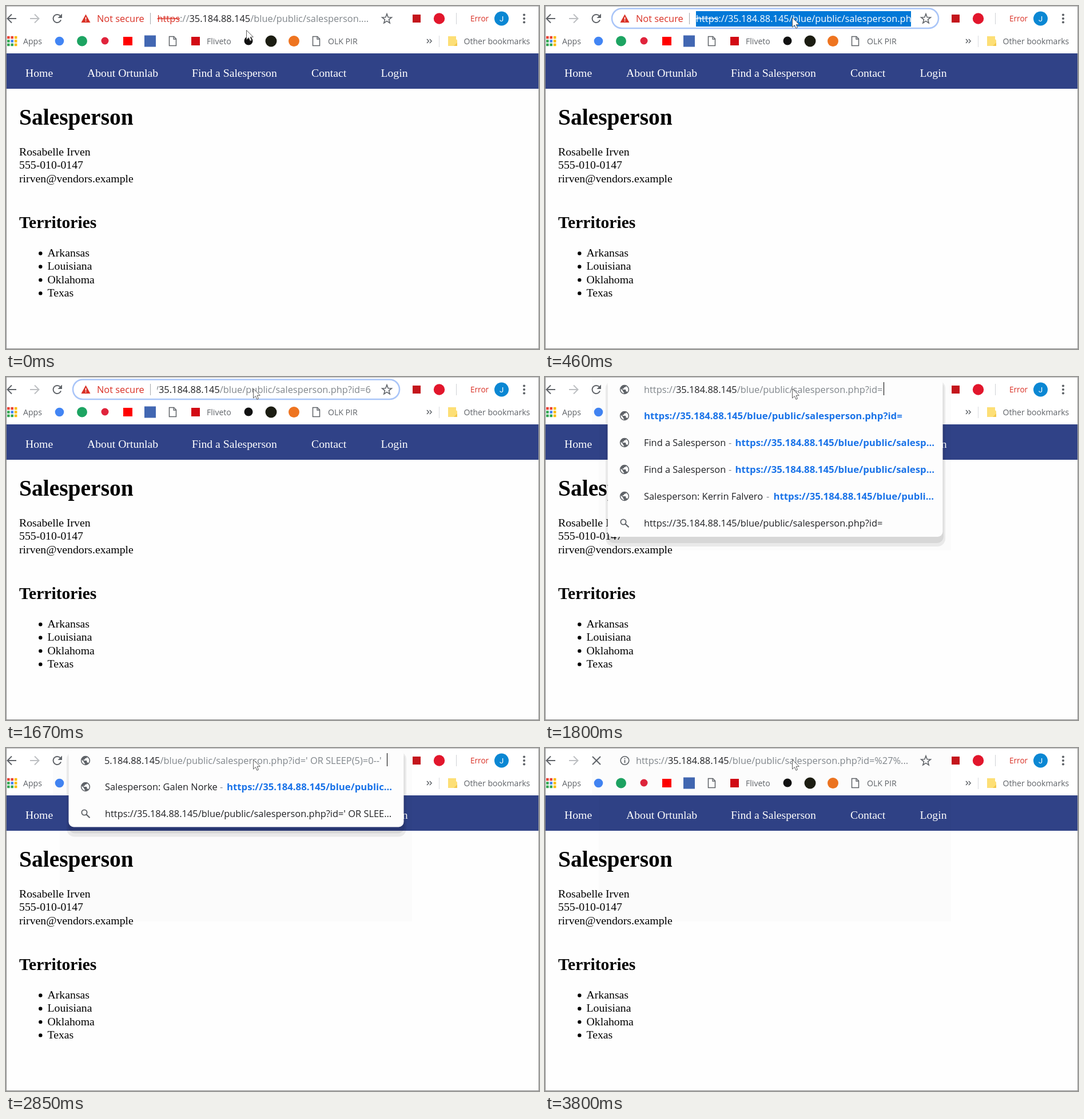
Write an HTML page with a canvas that moves like this. It is 932x601 px and loops after 8000 ms.

```html
<!DOCTYPE html>
<html lang="en">
<head>
<meta charset="utf-8">
<title>Salesperson</title>
<style>
html, body { margin: 0; width: 100%; height: 100%; overflow: hidden; background: #fff; }
canvas { display: block; }
</style>
</head>
<body>
<canvas id="stage" width="932" height="601"></canvas>
<script>
const ctx = document.getElementById('stage').getContext('2d');
const LOOP = 8000;
const UI = '"Open Sans", "Noto Sans", sans-serif';
const SERIF = '"Liberation Serif", "Times New Roman", serif';
const URL_FONT = `16.4px ${UI}`;
const BOLD_FONT = `bold 16.78px ${UI}`;
const MARK_FONT = `14.1px ${UI}`;
const BODY_FONT = `19.77px ${SERIF}`;
const INK = '#202124', GREY = '#80868b', ICON = '#5f6368', RED = '#d93025', LINK = '#1a73e8';
const HOST = '35.184.88.145', PATH = '/blue/public/salesperson';
const BASE = `https://${HOST}${PATH}.php?id=`;
const GLOBE = new Path2D('M12 2a10 10 0 1 0 0 20a10 10 0 1 0 0-20z' +
  'M11 19.9c-4-.5-7-3.8-7-7.9 0-.6.1-1.2.2-1.8L9 15v1c0 1.1.9 2 2 2z' +
  'M17.9 17.4c-.3-.8-1-1.4-1.9-1.4h-1v-3c0-.6-.4-1-1-1H8v-2h2c.6 0 1-.4 1-1V7h2c1.1 0 2-.9 2-2v-.4c2.9 1.2 5 4 5 7.4 0 2.1-.8 4-2.1 5.4z');

// ---------- helpers ----------
function text(str, x, y, font, color) {
  ctx.font = font;
  ctx.fillStyle = color;
  ctx.fillText(str, x, y);
  return x + ctx.measureText(str).width;
}

function widthOf(str, font) {
  ctx.font = font;
  return ctx.measureText(str).width;
}

function rect(x, y, w, h, color) {
  ctx.fillStyle = color;
  ctx.fillRect(x, y, w, h);
}

function disc(x, y, r, color) {
  ctx.fillStyle = color;
  ctx.beginPath();
  ctx.arc(x, y, r, 0, Math.PI * 2);
  ctx.fill();
}

function ring(x, y, r, color, width) {
  ctx.strokeStyle = color;
  ctx.lineWidth = width;
  ctx.beginPath();
  ctx.arc(x, y, r, 0, Math.PI * 2);
  ctx.stroke();
}

function trace(points, close) {
  ctx.beginPath();
  points.forEach(([x, y]) => ctx.lineTo(x, y));
  if (close) ctx.closePath();
}

function line(points, color, width = 2, close = false) {
  trace(points, close);
  ctx.strokeStyle = color;
  ctx.lineWidth = width;
  ctx.stroke();
}

function poly(points, color) {
  trace(points, true);
  ctx.fillStyle = color;
  ctx.fill();
}

function round(x, y, w, h, r, color) {
  ctx.beginPath();
  ctx.roundRect(x, y, w, h, r);
  ctx.fillStyle = color;
  ctx.fill();
}

function clipped(x, w, draw) {
  ctx.save();
  ctx.beginPath();
  ctx.rect(x, 5, w, 34);
  ctx.clip();
  draw();
  ctx.restore();
}

// ---------- icons ----------
function arrow(x, dir, color) {
  line([[x - 8 * dir, 22], [x + 7 * dir, 22]], color);
  line([[x, 14.5], [x + 7.5 * dir, 22], [x, 29.5]], color);
}

function reload() {
  ctx.strokeStyle = ICON;
  ctx.lineWidth = 2;
  ctx.beginPath();
  ctx.arc(89.5, 22, 7, 0.35, Math.PI * 1.75);
  ctx.stroke();
  poly([[98, 13.5], [98, 21], [90.5, 21]], ICON);
}

function stop() {
  line([[83, 15], [97, 29]], ICON);
  line([[97, 15], [83, 29]], ICON);
}

function warning() {
  poly([[139.5, 14.5], [147.5, 29], [131.5, 29]], RED);
  rect(138.7, 19.5, 1.7, 4.5, '#fff');
  rect(138.7, 25.3, 1.7, 1.7, '#fff');
}

function star() {
  const points = Array.from({ length: 10 }, (_, i) => {
    const r = i % 2 ? 3.7 : 8.8, a = i * Math.PI / 5 - Math.PI / 2;
    return [666 + r * Math.cos(a), 22.7 + r * Math.sin(a)];
  });
  line(points, ICON, 1.6, true);
}

function globe(y) {
  ctx.save();
  ctx.translate(139, y);
  ctx.scale(0.82, 0.82);
  ctx.translate(-12, -12);
  ctx.fillStyle = ICON;
  ctx.fill(GLOBE, 'evenodd');
  ctx.restore();
}

function magnifier(y) {
  ring(137, y - 2, 4.6, ICON, 1.9);
  line([[140.5, y + 1.5], [146.5, y + 7.3]], ICON, 2.2);
}

function info() {
  ring(139.5, 22, 7.3, ICON, 1.6);
  rect(138.6, 21, 1.8, 5.2, ICON);
  rect(138.6, 17.7, 1.8, 1.9, ICON);
}

function page(x) {
  line([[x, 53.5], [x + 8, 53.5], [x + 12, 57.5], [x + 12, 69.5], [x, 69.5]], ICON, 1.5, true);
  line([[x + 7.5, 54], [x + 7.5, 58], [x + 12, 58]], ICON, 1.3);
}

function pointer(x, y) {
  const shape = [[0, 0], [0, 16.5], [3.9, 13], [6.4, 18.7], [9, 17.5], [6.6, 12], [11.8, 11.7]]
    .map(([dx, dy]) => [x + 0.5 + dx, y + 0.5 + dy]);
  poly(shape, '#fff');
  line(shape, '#5c5c5c', 1, true);
}

// ---------- page ----------
function content() {
  rect(0, 0, 932, 601, '#fff');
  rect(0, 145, 932, 456, '#fefefe');
  rect(0, 83, 932, 62, '#304287');
  const nav = [['Home', 34], ['About Ortunlab', 142], ['Find a Salesperson', 325], ['Contact', 534], ['Login', 655.5]];
  nav.forEach(([label, x]) => text(label, x, 123.5, `19.7px ${SERIF}`, '#fff'));

  text('Salesperson', 23, 208, `bold 39.5px ${SERIF}`, '#000');
  ['Rosabelle Irven', '555-010-0147', 'rirven@vendors.example'].forEach((row, i) =>
    text(row, 23, 262 + i * 23.3, BODY_FONT, '#000'));
  text('Territories', 23, 388.5, `bold 29.6px ${SERIF}`, '#000');
  ['Arkansas', 'Louisiana', 'Oklahoma', 'Texas'].forEach((row, i) => {
    const y = 439 + i * 23.3;
    disc(60.3, y - 5.5, 3.2, '#000');
    text(row, 72.5, y, BODY_FONT, '#000');
  });
}

function bookmarks() {
  const tiles = ['#ea4335', '#ea4335', '#fbbc05', '#34a853', '#4285f4', '#fbbc05', '#34a853', '#34a853', '#fbbc05'];
  tiles.forEach((c, i) => rect(2 + (i % 3) * 6.4, 52.8 + Math.floor(i / 3) * 6.4, 4.6, 4.6, c));
  text('Apps', 30, 66.5, MARK_FONT, ICON);
  disc(93.5, 61.5, 7.8, '#4285f4');
  disc(133, 61.5, 9, '#1da462');
  disc(173, 61, 6.5, '#e0243c');
  rect(205, 54, 16, 15, '#f00');
  rect(242, 51.5, 20, 20, '#4267b2');
  page(285.5);
  rect(324, 54, 15, 15, '#d20a14');
  text('Fliveto', 351, 66.5, MARK_FONT, ICON);
  disc(424, 61, 7.5, '#111');
  disc(463.5, 61.5, 10, '#1c1d12');
  disc(503.5, 61.5, 9.5, '#ee7420');
  page(536.5);
  text('OLK PIR', 563, 66.5, MARK_FONT, ICON);
  [736, 740.8].forEach(x => line([[x, 58], [x + 3.3, 61.5], [x, 65]], ICON, 1.5));
  rect(757, 52, 1, 20, '#dadce0');
  poly([[773, 53], [787, 53], [787, 58], [789, 60], [789, 70], [773, 70]], '#fddf76');
  poly([[783, 70], [789, 64], [789, 70]], '#f3c84b');
  text('Other bookmarks', 800.5, 66.5, MARK_FONT, ICON);
}

function toolbar(loading) {
  arrow(10, -1, ICON);
  arrow(50, 1, '#bdbfc2');
  loading ? stop() : reload();
  rect(711, 15, 14, 14, '#c4161c');
  disc(757.5, 22, 9.7, '#e2162c');
  rect(787, 12, 1, 20, '#d0d2d5');
  text('Error', 812, 27, `13.6px ${UI}`, RED);
  disc(866.5, 22, 12.5, '#0b87d3');
  text('J', 863, 26.6, '13px Roboto, sans-serif', '#fff');
  [15.5, 22, 28.5].forEach(y => disc(906, y, 2.1, ICON));
}

function frame() {
  rect(0, 0, 932, 1, '#b4b4b4');
  rect(0, 0, 1, 601, '#8c8c8c');
  rect(931, 0, 1, 601, '#a0a0a0');
  rect(0, 600, 932, 1, '#8c8c8c');
}

// ---------- address bar ----------
function address(x, tail, scheme = GREY) {
  let end = text('https', x, 28, URL_FONT, scheme);
  if (scheme !== GREY) rect(x, 21.5, end - x, 1.5, scheme);
  end = text('://', end, 28, URL_FONT, GREY);
  end = text(HOST, end, 28, URL_FONT, INK);
  text(PATH + tail, end, 28, URL_FONT, GREY);
}

function caret(x) {
  rect(x, 9, 1, 23, '#000');
}

function insecure() {
  warning();
  text('Not secure', 159, 28, URL_FONT, RED);
  rect(252, 12, 1, 20, '#a5a8ac');
  star();
}

function focusRing(color, width) {
  round(117, 4.5, 571, 34.5, 17.2, '#fff');
  ctx.strokeStyle = color;
  ctx.lineWidth = width;
  ctx.stroke();
}

function selected() {
  rect(264, 9, 376, 27, '#0078d7');
  clipped(264, 376, () => {
    text(BASE, 264, 28, URL_FONT, '#fff');
    rect(264, 21.5, widthOf('https', URL_FONT), 1.3, '#fff');
  });
}

function scrolled() {
  clipped(264, 376, () => address(267 - widthOf('https://', URL_FONT), '.php?id=6'));
}

// ---------- suggestions ----------
function panel(bottom) {
  round(106, 6, 594, bottom + 11, 14, 'rgba(0,0,0,.07)');
  round(109, 6, 588, bottom + 5, 12, 'rgba(0,0,0,.08)');
  round(109.5, 3, 586, bottom - 3, 9, '#fdfdfd');
}

function suggestion(y, title, dashX, link, linkX) {
  globe(y);
  if (title) {
    text(title, 173, y + 6, URL_FONT, INK);
    text('-', dashX, y + 6, URL_FONT, GREY);
  }
  text(link, linkX, y + 6, BOLD_FONT, LINK);
}

function search(y, query) {
  magnifier(y);
  text(query, 173, y + 6, URL_FONT, INK);
}

function longList() {
  panel(280);
  globe(22);
  address(173, '.php?id=');
  suggestion(68, '', 0, BASE, 173);
  [115, 162].forEach(y => suggestion(y, 'Find a Salesperson', 321, `https://${HOST}/blue/public/salesp...`, 332.5));
  suggestion(209, 'Salesperson: Kerrin Falvero', 387, `https://${HOST}/blue/publi...`, 399.5);
  search(256, BASE);
}

function shortList() {
  panel(138.5);
  suggestion(68, 'Salesperson: Galen Norke', 374, `https://${HOST}/blue/public...`, 386);
  search(115, `${BASE}' OR SLEE...`);
}

function injected() {
  globe(22);
  clipped(172, 500, () =>
    address(172 - widthOf('https://3', URL_FONT), ".php?id=' OR SLEEP(5)=0--'"));
}

function pending() {
  info();
  address(159, '.php?id=%27%...');
  star();
}

function omnibox(t) {
  if (t < 320) {
    insecure();
    address(264.5, '....', RED);
  } else if (t < 1800) {
    focusRing(t < 460 ? '#d2e1fb' : '#a9c5f8', t < 460 ? 1.5 : 2.6);
    insecure();
    if (t < 1140) {
      selected();
    } else {
      scrolled();
      if (t < 1670) caret(639);
    }
  } else if (t < 2850) {
    longList();
    if (t < 2230) caret(592);
  } else if (t < 3800) {
    shortList();
    if (t < 3680) {
      injected();
      if (t < 3280) caret(666);
    } else {
      pending();
    }
  } else {
    pending();
  }
}

function render(t) {
  content();
  bookmarks();
  toolbar(t >= 3680);
  if (t >= 1800) {
    rect(82, 1, 628, 82, 'rgba(0,0,0,.012)');
    rect(94, 83, 616, 221, 'rgba(0,0,0,.01)');
  }
  omnibox(t);
  frame();
  if (t < 120) pointer(420, 42);
  else if (t < 320) pointer(420, 20);
  else pointer(432, 20);
}

function tick() {
  render(performance.now() % LOOP);
  requestAnimationFrame(tick);
}
tick();
</script>
</body>
</html>
```
